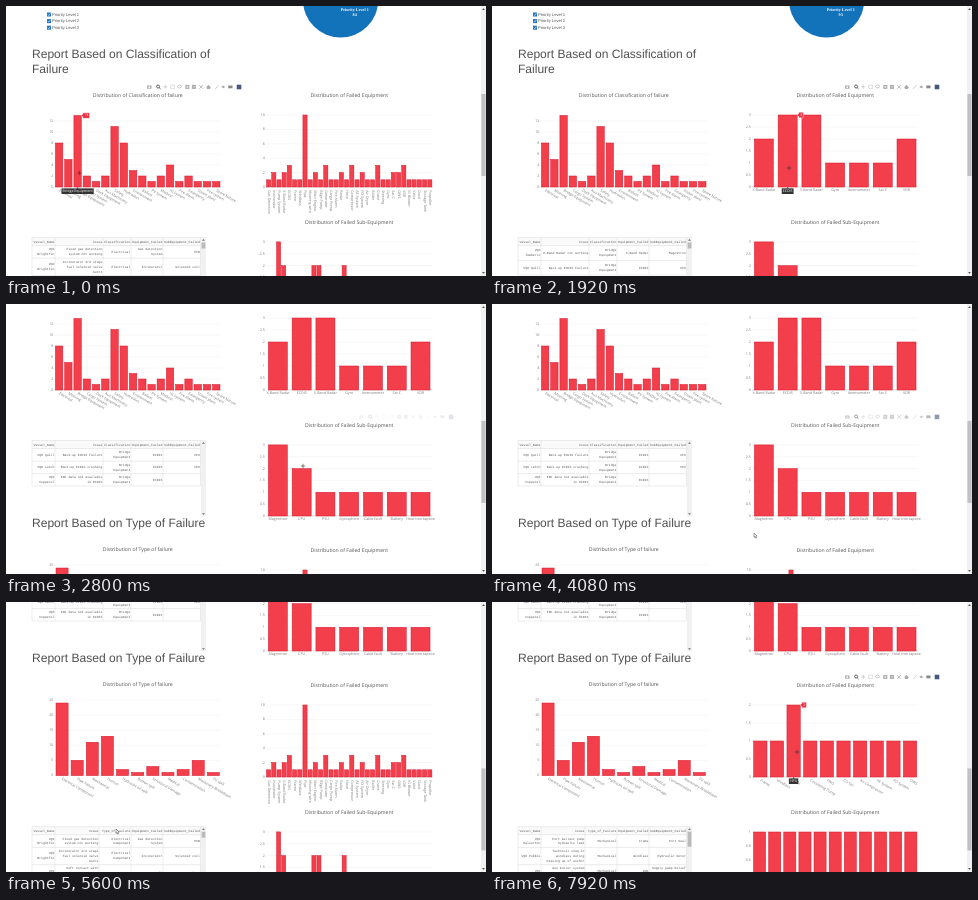
An HTML page with a canvas for the animation above (8 s loop, 480x270 px).

```html
<!DOCTYPE html>
<html lang="en">
<head>
<meta charset="utf-8">
<title>Failure report dashboard</title>
<style>
html, body { margin: 0; width: 480px; height: 270px; overflow: hidden; background: #fff; }
canvas { display: block; }
</style>
</head>
<body>
<canvas id="stage" width="480" height="270"></canvas>
<script>
const ctx = document.getElementById('stage').getContext('2d');
ctx.textRendering = 'geometricPrecision';
const LOOP = 8000;
const SANS = '"Open Sans", sans-serif', ARIAL = '"Liberation Sans", Arial, sans-serif',
      MONO = '"Liberation Mono", monospace';
const RED = '#f23f4b', EDGE = '#d8142a', INK = '#555';
const PLOT_W = 166.4, LEFT = 48.5, RIGHT = 260;

const clamp = v => Math.max(0, Math.min(1, v));
const smooth = v => { v = clamp(v); return v * v * (3 - 2 * v); };
const words = s => s.split(',');

function text(str, x, y, size, { font = SANS, color = INK, align = 'left', weight = '' } = {}) {
  ctx.font = `${weight} ${size}px ${font}`;
  ctx.fillStyle = color;
  ctx.textAlign = align;
  ctx.textBaseline = 'middle';
  ctx.fillText(str, x, y);
}
function box(x, y, w, h, color) {
  ctx.fillStyle = color;
  ctx.fillRect(x, y, w, h);
}
function frame(x, y, w, h, color, width = 0.6) {
  ctx.strokeStyle = color;
  ctx.lineWidth = width;
  ctx.strokeRect(x, y, w, h);
}
function line(x1, y1, x2, y2, color, width = 0.5) {
  ctx.strokeStyle = color;
  ctx.lineWidth = width;
  ctx.beginPath();
  ctx.moveTo(x1, y1);
  ctx.lineTo(x2, y2);
  ctx.stroke();
}
function shape(points, fill, stroke, width = 0.6) {
  ctx.beginPath();
  points.forEach(([x, y]) => ctx.lineTo(x, y));
  ctx.closePath();
  if (fill) { ctx.fillStyle = fill; ctx.fill(); }
  if (stroke) { ctx.strokeStyle = stroke; ctx.lineWidth = width; ctx.stroke(); }
}

// Data: bar values, labels, pixels per unit, tick step and label angle in degrees
const ones = (n, extra = {}) => Object.assign(Array(n).fill(1), extra);

const byClass = {
  values: [8, 5, 13, 2, 1, 2, 11, 8, 3, 2, 1, 2, 4, 1, 2, 1, 1, 1], unit: 5.5, step: 2, top: 12, angle: 30,
  labels: words('Electrical,Mooring,Bridge Equipment,Cargo System,Deck Equipment,Aux Machinery,Safety,Hydraulics,Environment,Ballast,PV System,Medical,IG System,Fire Alarm,Emergency,Steam plant,Fire system,Spare Nature')
};
const byType = {
  values: [24, 5, 11, 13, 2, 1, 3, 1, 2, 5, 1], unit: 3.02, step: 5, top: 25, angle: 30,
  labels: words('Electrical Component,Pipe Failure,Mechanical,Human,Hydraulic oil spill,Button spill,Structural Damage,Medical,Contamination,Machinery Breakdown,PV spill')
};
const allEquipment = {
  values: ones(32, { 1: 2, 3: 2, 4: 3, 7: 10, 9: 2, 11: 3, 14: 2, 16: 3, 18: 2, 21: 3, 24: 2, 25: 2, 26: 3 }),
  unit: 7.2, step: 2, top: 10, angle: 90,
  labels: words('Gas Detection,Incinerator,Pump System,X-Band Radar,ECDIS,Frame,Windlass,Pipe,Mooring wire,Main Engine,Bilge Pump,Generator,Cargo Pump,Fire Alarm,Radar,Hose,Compressor,AE System,FO System,Air Dryer,Boiler,Crane,Steering,Gyro,Sat C,OWS,VDR,IG Blower,Valve,Davit,Storage Tank,Propeller')
};
const bridgeEquipment = {
  values: [2, 3, 3, 1, 1, 1, 2], unit: 24, step: 0.5, top: 3, angle: 0,
  labels: words('X-Band Radar,ECDIS,S-Band Radar,Gyro,Anemometer,Sat C,VDR')
};
const mechEquipment = {
  values: ones(10, { 2: 2 }), unit: 36, step: 0.5, top: 2, angle: 30,
  labels: words('Frame,Windlass,HPU,Circulating Pump,FWG,CO fan,Air Compressor,AE System,FO System,OWS')
};
const allSubs = {
  values: ones(33, { 2: 3, 3: 2, 9: 2, 10: 2, 15: 2 }), unit: 23.7, step: 0.5, top: 3, angle: 90, labels: []
};
const bridgeSubs = {
  values: [3, 2, 1, 1, 1, 1, 1], unit: 23.7, step: 0.5, top: 3, angle: 0,
  labels: words('Magnetron,CPU,PSU,Gyrosphere,Cable fault,Battery,Heat tree tapeoe')
};
const mechSubs = { values: ones(11), unit: 71, step: 0.2, top: 1, angle: 30, labels: [] };

// Table rows: cells separated by ";", lines by "|"
const rows = (...list) => list.map(r => r.split(';').map(c => c.split('|')));
const generalRows = kind => rows(
  `VQO|Brightfin;Fixed gas detection|system not working;${kind};Gas detection|System;PCB`,
  `VQO|Brightfin;Incinerator 3rd stage|fuel solenoid valve|burnt;${kind};Incinerator;Solenoid coil`,
  `VQO|Brightfin;Soft contact with|berth during|mooring;Human;Hull;Plate`
);
const bridgeRow = (name, issue, gear, part) => `VQO${name};${issue};Bridge|Equipment;${gear};${part}`;
const bridgeRows = rows(
  bridgeRow('|Tamberlo', 'X-Band Radar not working', 'X-Band Radar', 'Magnetron'),
  bridgeRow(' Quill', 'Back up ECDIS Failure', 'ECDIS', 'CPU'));
const ecdisRows = rows(
  bridgeRow(' Quill', 'Back-up ECDIS failure', 'ECDIS', 'CPU'),
  bridgeRow(' Latch', 'Back-up ECDIS crashing', 'ECDIS', 'CPU'),
  bridgeRow('|Copperel', 'ENC data not available|in ECDIS', 'ECDIS', ''));
const mechRows = rows(
  'VQO|Halverton;Port ballast pump|hydraulic leak;Mechanical;Frame;Port Seal',
  'VQO Pebble;Technical snag in|windlass during|heaving up of anchor;Mechanical;Windlass;Hydraulic motor',
  'VQO;Aux boiler system|pump leaking;Mechanical;FWG;Supply pump Relief|valve');

// Motion
const mousePath = [
  [0, 73.5, 167], [560, 73.5, 167], [960, 268, 150], [1280, 268, 150], [1600, 297, 162],
  [3040, 297, 162], [3600, 291, 158], [3760, 291, 158], [4040, 263, 231], [4720, 263, 231],
  [5040, 160, 235], [5200, 111, 229], [5760, 111, 229], [6400, 86, 158], [7040, 86, 158],
  [7600, 305, 150], [LOOP, 305, 150]
];
function mouseAt(t) {
  const i = mousePath.findIndex(k => k[0] > t);
  const [t0, x0, y0] = mousePath[i - 1], [t1, x1, y1] = mousePath[i];
  const p = smooth((t - t0) / (t1 - t0));
  return { x: x0 + (x1 - x0) * p, y: y0 + (y1 - y0) * p };
}
const scrollAt = t => 95 * smooth((t - 2160) / 560) + 163 * smooth((t - 4120) / 400);
const isScrolling = t => (t > 2160 && t < 2720) || (t > 4120 && t < 4520);

function chartsAt(t) {
  const first = t >= 240, second = t >= 7040;
  const chart = (x, base, titleY, title, data, on, off) =>
    ({ x, base, titleY, title: 'Distribution of ' + title, on, off, ...data });
  return [
    chart(LEFT, 181, 89.6, 'Classification of failure', byClass, -500, 680),
    chart(RIGHT, 181, 89.6, 'Failed Equipment', first ? bridgeEquipment : allEquipment, 780, 2200),
    chart(RIGHT, 307, 216.5, 'Failed Sub-Equipment', first ? bridgeSubs : allSubs, 2760, 4200),
    chart(LEFT, 431.5, 340.4, 'Type of failure', byType, 5900, 7220),
    chart(RIGHT, 433, 341.6, 'Failed Equipment', second ? mechEquipment : allEquipment, 7320, 9000),
    chart(RIGHT, 559, 468.5, 'Failed Sub-Equipment', second ? mechSubs : allSubs, 4580, 4860)
  ];
}

function drawModebar(right, y, alpha) {
  if (alpha <= 0) return;
  const grey = '#aaa';
  ctx.save();
  ctx.globalAlpha = alpha;
  ctx.translate(right - 92.7, y);
  box(-2.2, -1.4, 4.4, 3.2, grey);
  box(-0.8, -0.5, 1.6, 1.6, '#fff');
  ctx.strokeStyle = '#555';
  ctx.lineWidth = 0.9;
  ctx.beginPath();
  ctx.arc(8.8, -0.4, 1.5, 0, 7);
  ctx.stroke();
  line(9.9, 0.7, 11.2, 2, '#555', 1);
  line(14, 0, 18, 0, grey);
  line(16, -2, 16, 2, grey);
  ctx.setLineDash([1, 0.6]);
  frame(21.4, -1.8, 3.6, 3.6, grey);
  ctx.setLineDash([]);
  ctx.beginPath();
  ctx.ellipse(30.2, -0.4, 2, 1.4, 0, 0, 7);
  ctx.stroke();
  for (const x of [38, 44.6]) {
    box(x - 2, -2, 4, 4, grey);
    line(x - 1.2, 0, x + 1.2, 0, '#fff', 0.6);
  }
  line(38, -1.2, 38, 1.2, '#fff', 0.6);
  line(50, -1.8, 53.6, 1.8, grey, 0.8);
  line(50, 1.8, 53.6, -1.8, grey, 0.8);
  shape([[57, 0.2], [59.2, -2], [61.4, 0.2], [60.6, 2], [57.8, 2]], grey);
  line(66, 2, 69, -1.5, grey, 0.6);
  shape([[72, 0], [74, -1.4], [76, 0], [74, 1.4]], grey);
  box(79, -1.4, 4.2, 2.8, '#888');
  box(87.4, -2.2, 4.6, 4.6, '#46587f');
  ctx.restore();
}

function hoveredBar(c, mouse, scroll) {
  const pitch = PLOT_W / c.values.length;
  const i = Math.floor((mouse.x - c.x) / pitch);
  const base = c.base - scroll;
  const inBar = Math.abs(mouse.x - c.x - (i + 0.5) * pitch) < pitch * 0.4;
  return inBar && mouse.y < base && mouse.y > base - c.values[i] * c.unit ? i : -1;
}

function drawChart(c, t) {
  const { x, base, values, unit } = c;
  const pitch = PLOT_W / values.length;
  text(c.title, x + PLOT_W / 2, c.titleY, 5.15, { align: 'center' });
  for (let k = 0; k * c.step <= c.top + 0.01; k++) {
    const y = base - k * c.step * unit;
    line(x, y, x + PLOT_W, y, k ? '#eee' : '#ccc');
    text(String(+(k * c.step).toFixed(1)), x - 1.2, y, 3.64, { align: 'right', color: '#777' });
  }
  values.forEach((v, i) => {
    const bx = x + (i + 0.1) * pitch, w = pitch * 0.8, h = v * unit;
    box(bx, base - h, w, h, RED);
    frame(bx, base - h, w, h, EDGE, 0.5);
  });
  c.labels.forEach((label, i) => {
    ctx.save();
    ctx.translate(x + (i + 0.5) * pitch, base + 3.3);
    ctx.rotate(c.angle * Math.PI / 180);
    text(label, 0, 0, 3.64, { align: c.angle ? 'left' : 'center', color: '#777' });
    ctx.restore();
  });
  const alpha = Math.min(clamp((t - c.on) / 250), clamp((c.off - t) / 200));
  drawModebar(x === LEFT ? 236 : 448, c.titleY - 8.7, alpha);
}

function drawHover(c, i) {
  const pitch = PLOT_W / c.values.length;
  const mid = c.x + (i + 0.5) * pitch, edge = mid + pitch * 0.4, y = c.base - c.values[i] * c.unit;
  const value = String(c.values[i]), w = value.length * 2.1 + 2.4;
  shape([[edge, y], [edge + 1.6, y - 1.5], [edge + 1.6, y - 2.8], [edge + 1.6 + w, y - 2.8],
         [edge + 1.6 + w, y + 2.8], [edge + 1.6, y + 2.8], [edge + 1.6, y + 1.5]], '#ec2f40', '#fff', 0.4);
  text(value, edge + 1.6 + w / 2, y, 3.7, { color: '#fff', align: 'center' });

  const label = c.labels[i];
  if (!label) return;
  ctx.font = `3.6px ${SANS}`;
  const half = ctx.measureText(label).width / 2 + 1;
  box(mid - half, c.base + 1.4, half * 2, 5.6, '#333');
  shape([[mid - 1.3, c.base + 1.5], [mid, c.base + 0.2], [mid + 1.3, c.base + 1.5]], '#333');
  text(label, mid, c.base + 4.2, 3.6, { color: '#fff', align: 'center' });
}

function drawTable(top, kind, kindX, data, { gap = 0, thumb = 0 } = {}) {
  const edges = [26, 49, kindX, 125, 157, 194.5], bottom = top + 76, rule = '#d8d8d8';
  const titles = ['Vessel_Name', 'Issue', kind, 'Equipment_Failed', 'SubEquipment_Failed'];
  const cell = (str, col, y) => text(str, edges[col + 1] - 0.7, y, 3.15, { font: MONO, align: 'right' });
  box(26, top, 168.5, 8, '#fafafa');
  titles.forEach((title, i) => cell(title, i, top + 4.2));
  line(26, top, 200, top, rule);
  line(26, top + 8, 194.5, top + 8, rule);
  let y = top + 8.3;
  for (const row of data) {
    const h = Math.max(...row.map(c => c.length)) * 4.9 + 2.6 + gap;
    row.forEach((lines, col) => lines.forEach((str, n) =>
      cell(str, col, y + h / 2 + (n - (lines.length - 1) / 2) * 4.9)));
    y += h;
    line(26, y, 194.5, y, rule);
  }
  edges.forEach(x => line(x, top, x, y, rule));
  box(195, top, 5, bottom - top, '#f1f1f1');
  box(195.6, top + 5, 3.8, thumb, '#bbb');
  shape([[196, top + 3.2], [197.5, top + 1.6], [199, top + 3.2]], '#777');
  shape([[196, bottom - 3.2], [197.5, bottom - 1.6], [199, bottom - 3.2]], '#777');
}

function drawTables(t) {
  const drawFirst = (data, look) => drawTable(231.5, 'Classification', 97, data, look);
  const drawSecond = (data, look) => drawTable(482.7, 'Type_of_Failure', 93, data, look);
  if (t < 240) drawFirst(generalRows('Electrical'), { thumb: 6 });
  else if (t < 2040) drawFirst(bridgeRows, { gap: 2.2, thumb: 6 });
  else drawFirst(ecdisRows);
  if (t < 7040) drawSecond(generalRows('Electrical|Component'), { thumb: 6 });
  else drawSecond(mechRows, { thumb: 15 });
}

function drawHeader(t) {
  [1, 2, 3].forEach(n => {
    const y = 8.5 + (n - 1) * 6.6;
    box(41, y - 2, 4, 4, '#1f72c4');
    ctx.strokeStyle = '#fff';
    ctx.lineWidth = 0.6;
    ctx.beginPath();
    ctx.moveTo(41.8, y);
    ctx.lineTo(42.7, y + 1);
    ctx.lineTo(44.3, y - 1.1);
    ctx.stroke();
    text('Priority Level ' + n, 46, y, 4.1, { font: ARIAL });
  });
  ctx.fillStyle = '#1272ba';
  ctx.beginPath();
  ctx.arc(334.6, -6, 37.6, 0, 7);
  ctx.fill();
  const filtered = t >= 240;
  const style = { font: '"Liberation Serif", serif', color: '#fff', align: 'center', weight: 'bold' };
  text('Priority Level 1', 348.7, 3.6, 4.2, style);
  text(filtered ? '93' : '84', 348.7, 8.6, 4.2, style);
}

function drawMouse(m, overPlot) {
  if (overPlot) {
    line(m.x - 2.2, m.y, m.x + 2.2, m.y, '#333', 0.6);
    line(m.x, m.y - 2.2, m.x, m.y + 2.2, '#333', 0.6);
  } else {
    const outline = [[0, 0], [0, 4.4], [1, 3.5], [1.8, 5.1], [2.5, 4.8], [1.8, 3.2], [3.1, 3.1]];
    shape(outline.map(([x, y]) => [m.x - 1 + x, m.y - 2 + y]), '#fff', '#444', 0.5);
  }
}

function drawScrollbar(scroll) {
  box(475, 0, 5, 270, '#f1f1f1');
  box(475.4, 88 + scroll * 0.304, 4.2, 82, '#c1c1c1');
  shape([[476, 4], [477.5, 2.2], [479, 4]], '#555');
  shape([[476, 266], [477.5, 267.8], [479, 266]], '#555');
}

function draw(t) {
  const scroll = scrollAt(t), mouse = mouseAt(t), charts = chartsAt(t);
  box(0, 0, 480, 270, '#fff');
  ctx.save();
  ctx.translate(0, -scroll);
  drawHeader(t);
  const heading = (str, y) => text(str, 26, y, 12.05, { font: ARIAL, color: '#505050' });
  heading('Report Based on Classification of', 48.8);
  heading('Failure', 63.8);
  heading('Report Based on Type of Failure', 315);
  charts.forEach(c => drawChart(c, t));
  drawTables(t);
  if (!isScrolling(t)) {
    for (const c of charts) {
      const i = hoveredBar(c, mouse, scroll);
      if (i >= 0) drawHover(c, i);
    }
  }
  ctx.restore();
  const overPlot = charts.some(c => mouse.x > c.x && mouse.x < c.x + PLOT_W &&
    mouse.y < c.base - scroll && mouse.y > c.base - scroll - 78);
  drawMouse(mouse, overPlot);
  drawScrollbar(scroll);
}

const start = performance.now();
function tick() {
  draw((performance.now() - start) % LOOP);
  requestAnimationFrame(tick);
}
tick();
</script>
</body>
</html>
```
